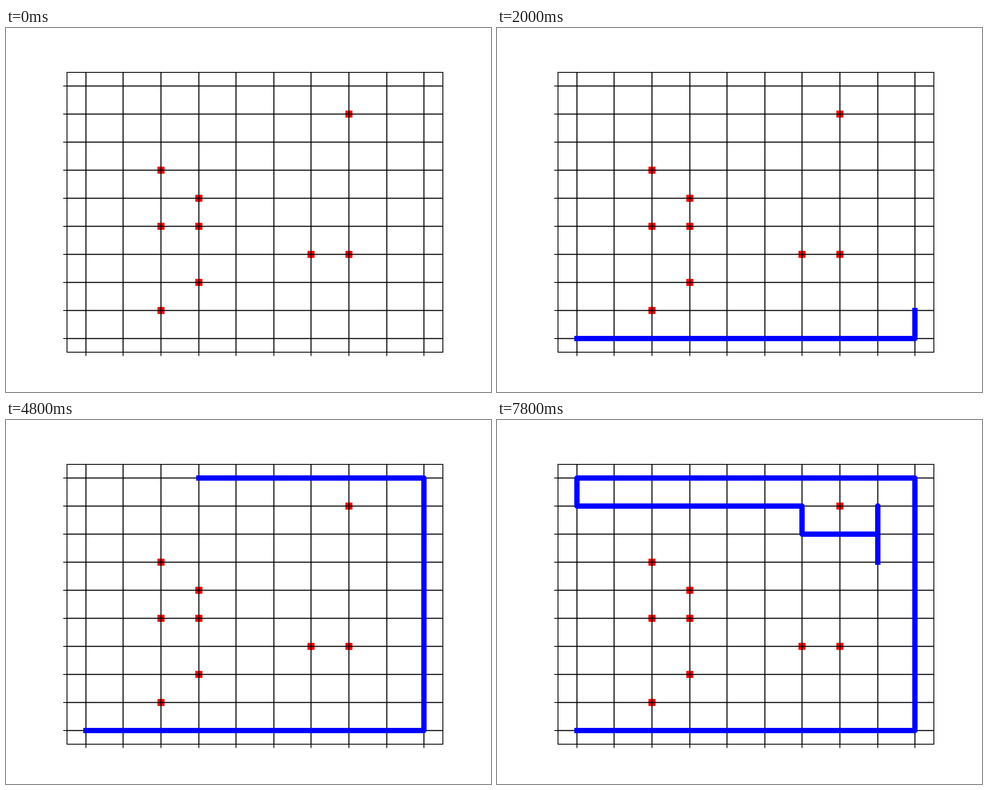
A matplotlib script that plays this animation: 640 by 480 pixels, repeating every 8 s.

```python
import matplotlib.pyplot as plt
from matplotlib.animation import FuncAnimation

SIZE = 10
FRAMES = 40
INTERVAL = 200

# Blocked rows in each column
WALLS = {2: (1, 4, 6), 3: (2, 4, 5), 6: (3,), 7: (3, 8)}
blocked = [(x, y) for x, rows in WALLS.items() for y in rows]


def neighbours(x, y):
    """Free cells next to (x, y); the last one is explored first."""
    for cell in (x, y - 1), (x - 1, y), (x, y + 1), (x + 1, y):
        if cell not in blocked and all(0 <= c < SIZE for c in cell):
            yield cell


def depth_first(start):
    """Cells in the order a depth-first search visits them."""
    order, stack = [], [start]
    while stack:
        cell = stack.pop()
        if cell not in order:
            order.append(cell)
            stack.extend(neighbours(*cell))
    return order


route = depth_first((0, 0))

fig, ax = plt.subplots(figsize=(6.4, 4.8), dpi=100)
ax.set(xlim=(-0.5, SIZE - 0.5), ylim=(-0.5, SIZE - 0.5),
       xticks=range(SIZE), yticks=range(SIZE))
ax.tick_params(labelbottom=False, labelleft=False)
ax.set_axisbelow("line")
ax.grid(color="black", linewidth=1)
ax.scatter(*zip(*blocked), color="red", marker="s")
trail, = ax.plot([], [], color="blue", linewidth=5)


def draw(step):
    # A lone starting cell has no line yet.
    cells = route[:step + 1] if step else []
    trail.set_data([x for x, _ in cells], [y for _, y in cells])
    return trail,


anim = FuncAnimation(fig, draw, frames=FRAMES, interval=INTERVAL,
                     repeat=True, repeat_delay=0)
plt.show()
```
